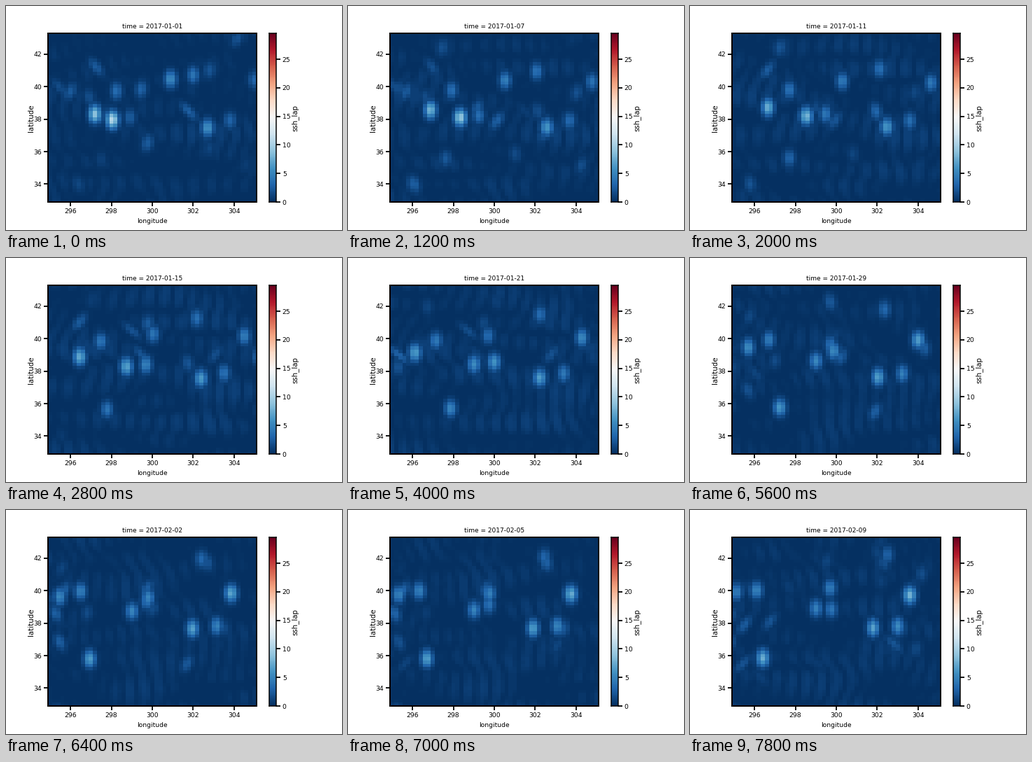
Recreate the animation shown at these times as a matplotlib script. Size 480 by 320 pixels, loop 8 s.

```python
import numpy as np
import matplotlib.pyplot as plt
from matplotlib.animation import FuncAnimation

W, H, DPI = 480, 320, 80
PT = 72 / DPI                      # points per pixel
FRAMES, STEP = 40, 200             # one frame per day
WEST, EAST, SOUTH, NORTH = 294.9, 305.1, 32.9, 43.3
VMAX = 29.6
CMAP = "RdBu_r"

plt.rcParams.update({"font.family": "DejaVu Sans", "font.size": 9.3 * PT})

rng = np.random.default_rng(12)
lon, lat = np.meshgrid(np.linspace(WEST + .1, EAST - .1, 51),
                       np.linspace(SOUTH + .1, NORTH - .1, 52))

# Strong eddies: evenly timed waypoints (lon, lat, strength)
EDDIES = [
    [(298.05, 37.95, 11), (299, 38.4, 5.5), (299, 38.9, 4.7)],
    [(298.9, 38.1, 2.5), (300, 38.5, 6), (299.7, 40.15, 4.5)],
    [(300.9, 40.45, 5.5), (299.7, 40.2, 3.5), (299.75, 38.85, 4)],
    [(297.5, 35.5, 1), (297.9, 35.7, 5), (296.4, 35.85, 7.5)],
    [(297.2, 38.3, 9), (295.1, 39.9, 4.5)],
    [(298.25, 39.7, 3.5), (296.1, 40, 5)],
    [(302, 40.7, 4), (302.5, 42.2, 3)],
    [(302.7, 37.45, 6), (301.8, 37.7, 7)],
    [(303.8, 37.9, 3), (303, 37.8, 5.5)],
    [(305, 40.4, 3), (303.6, 39.7, 8)],
]


def blob(x, y, amp, tilt=0.):
    """Upright oval bump, sheared by tilt."""
    dy = lat - y
    dx = lon - x - tilt * dy
    return amp * np.exp(-(dx / .2) ** 2 / 2 - (dy / .36) ** 2 / 2)


def follow(points, day):
    days = np.linspace(0, FRAMES - 1, len(points))
    return [np.interp(day, days, p) for p in zip(*points)]


# Weak eddies: random birth, westward drift, swelling and fading
WEAK, LIFE, DRIFT = 75, 14, -.05
weak = list(zip(rng.uniform(-LIFE, FRAMES, WEAK), rng.uniform(WEST, EAST + .4, WEAK),
                rng.normal(38.7, 2.8, WEAK), rng.uniform(1.2, 3.2, WEAK),
                rng.normal(0, .25, WEAK)))

# Faint background: squared sum of tall, westward waves
N = 24
kx = rng.normal(4.2, .7, N)
ky = rng.normal(0, 1.7, N)
speed = rng.normal(.07, .03, N)
phase = rng.uniform(0, 2 * np.pi, N)


def field(day):
    waves = sum(np.cos(kx[i] * (lon - WEST + speed[i] * day) + ky[i] * (lat - SOUTH) + phase[i])
                for i in range(N))
    z2 = waves ** 2 * 2 / N
    total = 1.3 * z2 / (z2 + 4)
    for points in EDDIES:
        total = np.maximum(total, blob(*follow(points, day)))
    for birth, x, y, amp, tilt in weak:
        age = day - birth
        if 0 < age < LIFE:
            swell = amp * np.sin(np.pi * age / LIFE)
            total = np.maximum(total, blob(x + DRIFT * age, y, swell, tilt))
    return total


def date(day):
    month, dom = (1, day + 1) if day < 31 else (2, day - 30)
    return f"time = 2017-{month:02d}-{dom:02d}"


fig = plt.figure(figsize=(W / DPI, H / DPI), dpi=DPI, facecolor="white")


def panel(x0, y0, x1, y1, line):
    ax = fig.add_axes([x0 / W, 1 - y1 / H, (x1 - x0) / W, (y1 - y0) / H])
    for s in ax.spines.values():
        s.set_linewidth(line * PT)
    ax.tick_params(length=6 * PT, width=1.8 * PT, pad=2.5 * PT)
    return ax


def label(x, y, text, size, rotation=0):
    return fig.text(x / W, 1 - y / H, text, fontsize=size * PT, rotation=rotation,
                    ha="center", va="center")


ax = panel(60, 38.7, 357.8, 280, 2)
img = ax.imshow(field(0), origin="lower", extent=(WEST, EAST, SOUTH, NORTH), aspect="auto",
                cmap=CMAP, vmin=0, vmax=VMAX, interpolation="nearest")
ax.set_xticks(range(296, 305, 2))
ax.set_yticks(range(34, 43, 2))

bar = panel(376.3, 38.7, 386.3, 280, 1.5)
bar.imshow(np.linspace(0, 1, 256)[:, None], origin="lower", extent=(0, 1, 0, VMAX),
           aspect="auto", cmap=CMAP)
bar.set_xticks([])
bar.set_yticks(range(0, 26, 5))
bar.yaxis.tick_right()

title = label(208.8, 30, date(0), 9)
label(208.8, 307, "longitude", 9.1)
label(35.5, 160.5, "latitude", 10.2, 90)
label(412.5, 160.5, "ssh_lap", 10.3, 90)


def draw(day):
    img.set_data(field(day))
    title.set_text(date(day))
    return img, title


anim = FuncAnimation(fig, draw, frames=FRAMES, interval=STEP, repeat=True, repeat_delay=0)
plt.show()
```
